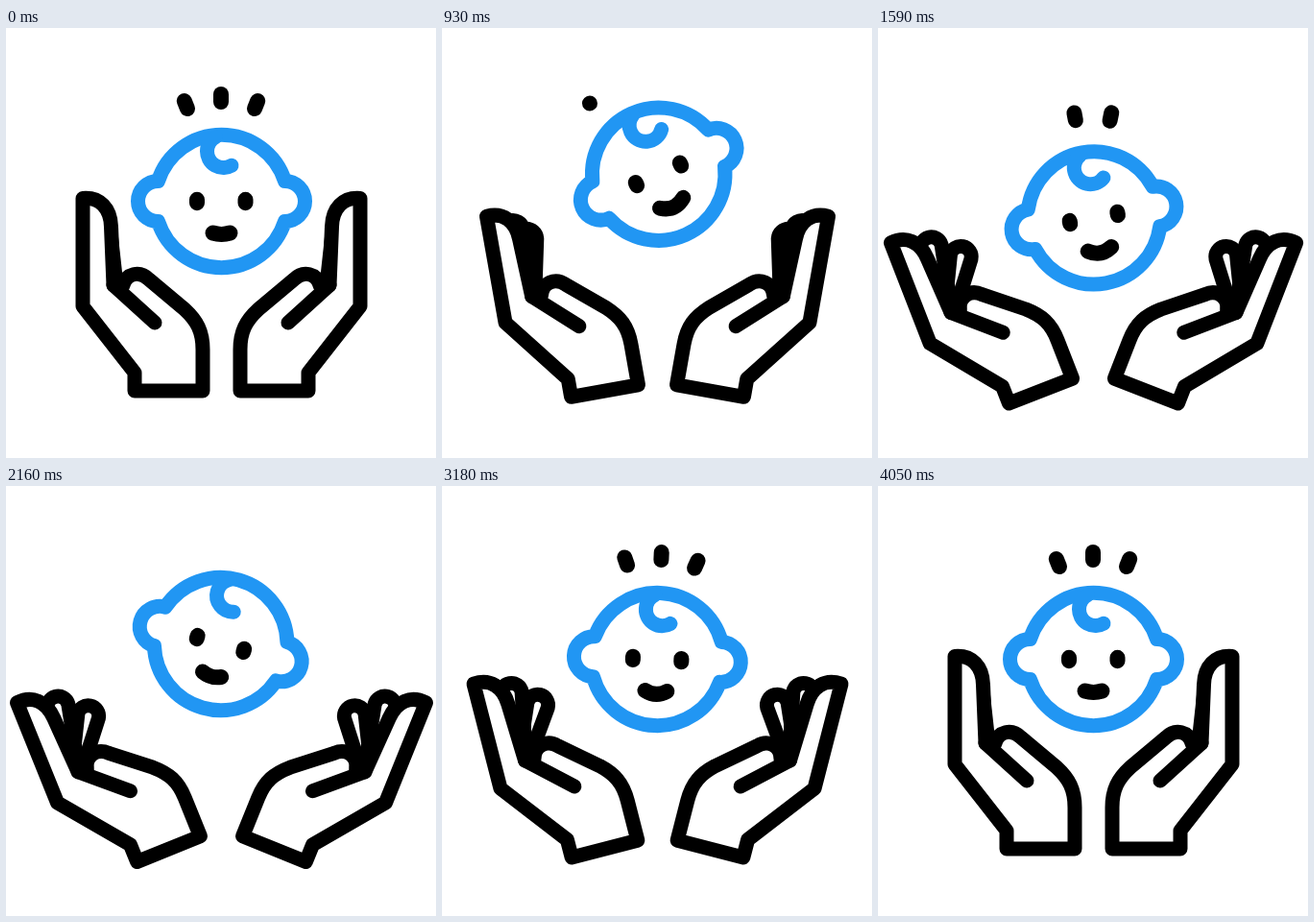
These frames come from a looping animation (448 px wide and 448 px high, 4.53 s). An HTML page:

```html
<!DOCTYPE html>
<html lang="en">
<head>
<meta charset="utf-8">
<title>Baby and hands</title>
<style>
  html, body { margin: 0; width: 100%; height: 100%; overflow: hidden; background: #fff; }
  svg { display: block; width: 100%; height: 100%; }
  path { stroke-width: 15; stroke-linecap: round; stroke-linejoin: round; }
  .ink { stroke: #000; fill: none; }
  .solid { stroke: #000; fill: #fff; }
  .blue { stroke: #2196f3; fill: none; }
  #head .ink { stroke-width: 16; }
</style>
</head>
<body>
<svg viewBox="0 0 448 448">
  <defs>
    <g id="hand">
      <g class="finger"><path class="solid" d="M-5 0L-11 -60A11 11 0 0 1 11 -60L5 0"/></g>
      <g class="finger"><path class="solid" d="M-3 0L-11 -71A11 11 0 0 1 11 -71L3 0"/></g>
      <path class="solid" d="M80 177.5C98 176 109 188 109.5 207L112 268H122C125 256 139 252 149 262L186 293C199 305 205 316 205 335V378H134V359L80 290Z"/>
      <path class="ink" d="M112 268L155 307"/>
    </g>
  </defs>
  <g id="left"></g>
  <g transform="translate(449 0) scale(-1 1)"><g id="right"></g></g>
  <g id="head">
    <path class="blue" d="M-66 -21A69.3 69.3 0 0 1 66 -21A21 21 0 0 1 66 21A69.3 69.3 0 0 1 -66 21A21 21 0 0 1 -66 -21Z"/>
    <path class="blue" id="curl"/>
    <path class="ink" d="M-25.5 -1.7V1.7M25 -1.7V1.7"/>
    <path class="ink" id="mouth"/>
    <path class="ink mark"/>
    <path class="ink mark"/>
    <path class="ink mark"/>
  </g>
</svg>
<script>
const LOOP = 4530;
const $ = id => document.getElementById(id);
const sine = p => (1 - Math.cos(Math.PI * p)) / 2;
const easeOut = p => 1 - (1 - p) ** 1.5;
const span = (t, start, length) => Math.min(1, Math.max(0, (t - start) / length));
const ramp = (t, start, length) => sine(span(t, start, length));

// Swings from 0 through each extreme in turn, then back to 0.
function swing(t, first, step, extremes) {
  return [...extremes, 0].reduce((value, next, i) => {
    const p = i ? ramp(t, first + (i - 1) * step, step) : ramp(t, 0, first);
    return value + (next - value) * p;
  }, 0);
}
const headLift = t => swing(t, 1030, 540, [-29, 17.5, -16.5, 10]);
const headTurn = t => swing(t, 1020, 570, [-24.5, -10.4, 16, -10.3, 4]);

const markPaths = document.querySelectorAll('.mark');
const hands = ['left', 'right'].map(id => {
  const group = $(id);
  group.append(...$('hand').cloneNode(true).children);
  return { group, fingers: group.querySelectorAll('.finger') };
});

function drawHands(t) {
  const open = easeOut(span(t, 540, 1170)) - ramp(t, 2700, 1200);
  const fan = easeOut(span(t, 630, 1050)) - ramp(t, 2940, 1110);
  for (const { group, fingers } of hands) {
    group.setAttribute('transform', `rotate(${-22 * open} 170 378)`);
    [46, 18.5].forEach((spread, i) =>
      fingers[i].setAttribute('transform', `translate(110 268) rotate(${-12 + spread * fan})`));
  }
}

// The curl is a hook that trails behind the turning head.
function drawCurl(lag) {
  const r = 17, x = 2 - lag * .3, y = -52;
  const end = (60 + lag) * Math.PI / 180;
  $('curl').setAttribute('d', `M${x - 8} -67Q${x - r} -62 ${x - r} ${y}` +
    `A${r} ${r} 0 0 0 ${x + r * Math.cos(end)} ${y + r * Math.sin(end)}`);
}

function drawMouth(t, lag) {
  const smile = ramp(t, 0, 540) - ramp(t, 3600, 450);
  const half = 9 + smile * (2.2 - lag * .1);
  $('mouth').setAttribute('d', `M${-half} 33Q0 ${22 - .6 + half * 1.6} ${half} 33`);
}

// Marks fade inwards as the head flies up and grow outwards as it lands.
function drawMarks(t) {
  markPaths.forEach((path, i) => {
    const side = i - 1;
    const grow = 1 - ramp(t, 800 - i * 55, 135)
      + ramp(t, 1360, 100) - ramp(t, 1470 + i * 110, 120)
      + ramp(t, 2320 + i * 180, 140);
    const x = side * 35 - .5, y = side ? -96.5 : -103.5;
    const length = 8 * grow;
    const lean = side * .4;
    path.setAttribute('d', `M${x} ${y}l${length * lean} ${-length}`);
    path.setAttribute('visibility', grow > .001 ? 'visible' : 'hidden');
  });
}

function draw(t) {
  const turn = headTurn(t);
  const lag = headTurn(Math.max(0, t - 150));
  $('head').setAttribute('transform',
    `translate(${224.5 - turn * .05} ${180.5 + headLift(t)}) rotate(${turn})`);
  drawHands(t);
  drawCurl(lag);
  drawMouth(t, lag);
  drawMarks(t);
}

let start;
function tick(now) {
  start ??= now;
  draw((now - start) % LOOP);
  requestAnimationFrame(tick);
}
draw(0);
requestAnimationFrame(tick);
</script>
</body>
</html>
```
